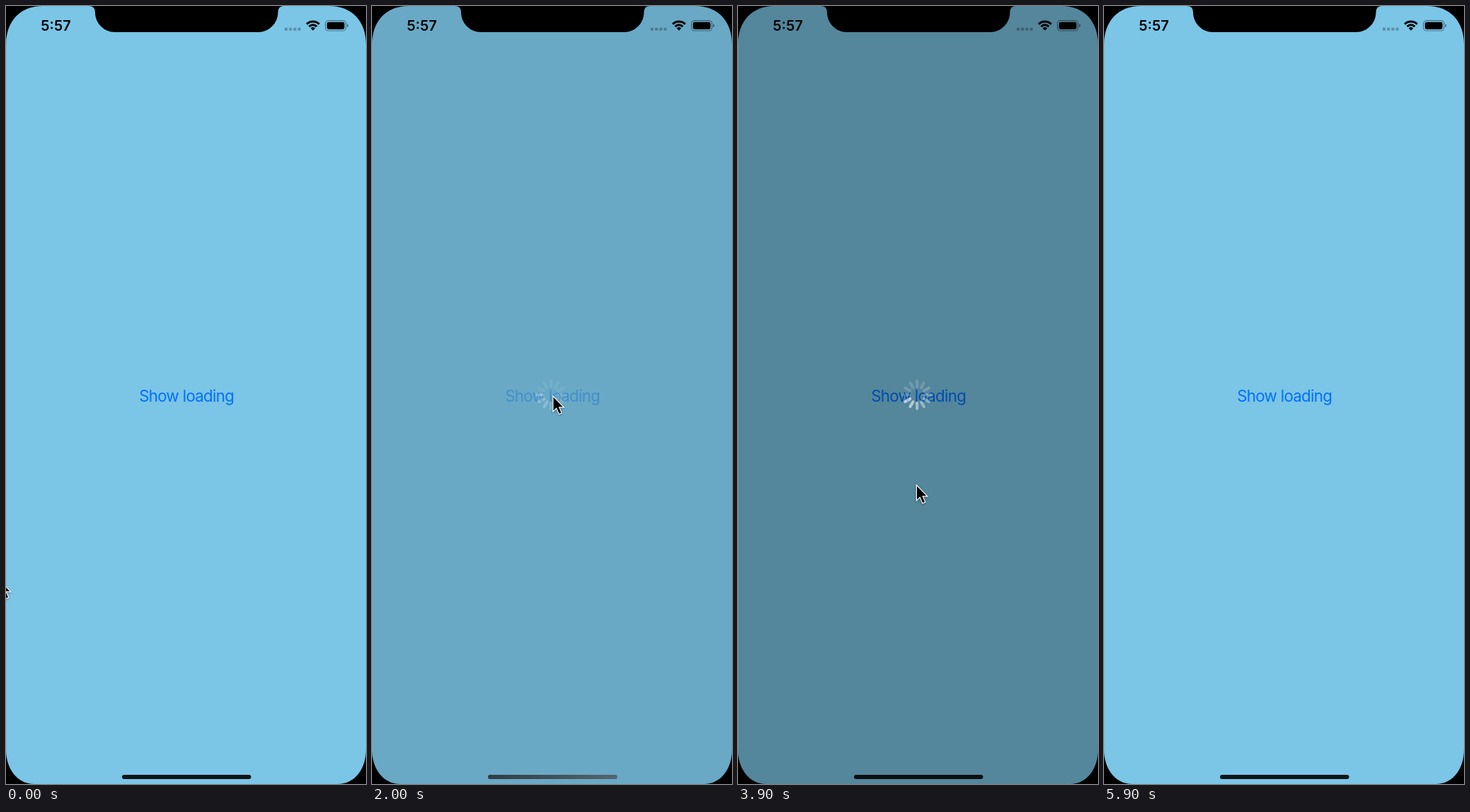
Animation of 509x1101 px, one loop 6 s. Source, as an HTML page:

```html
<!DOCTYPE html>
<html lang="en">
<head>
<meta charset="utf-8">
<title>Loading overlay</title>
<style>
  html, body { margin: 0; width: 100%; height: 100%; overflow: hidden; background: #000; }
  svg { display: block; width: 100%; height: 100%; }
  text { font-family: Inter, Roboto, sans-serif; text-anchor: middle; }
</style>
</head>
<body>
<svg viewBox="0 0 509 1101">
  <defs>
    <clipPath id="screen">
      <path d="M0 55C0 21 20 0 52 0H457C489 0 509 21 509 55V1052C509 1080 493 1101 469 1101H40C16 1101 0 1080 0 1052Z"/>
    </clipPath>
    <linearGradient id="sheen">
      <stop stop-color="#7e98a6" stop-opacity=".38"/>
      <stop offset="1" stop-color="#7e98a6" stop-opacity=".75"/>
    </linearGradient>
  </defs>
  <g clip-path="url(#screen)">
    <rect width="509" height="1101" fill="#7bc5e6"/>
    <text id="label" x="255.2" y="560" font-size="22.3" letter-spacing="-.7" fill="#0070fb">Show loading</text>
    <rect x="164" y="1088" width="182.5" height="6" rx="3" fill="#0e1417"/>
    <rect id="glow" x="164" y="1088" width="182.5" height="6" rx="3" fill="url(#sheen)"/>
    <rect id="dim" width="509" height="1101"/>
    <g id="spinner" transform="translate(253.2 550.2)" stroke="#fff" stroke-width="4" stroke-linecap="round"/>
    <rect width="1" height="1101" fill="#a0b0b5" opacity=".45"/>
  </g>
  <path d="M117 0Q126 0 126 9C126 24.5 138.5 37 154 37H356.5C372 37 384.5 24.5 384.5 9Q384.5 0 393 0Z"/>

  <text x="70.5" y="35" font-size="20" font-weight="600">5:57</text>
  <path d="M394 32.7H417" stroke="#000" stroke-opacity=".27" stroke-width="4" stroke-dasharray="4 2.2"/>
  <g fill="none" stroke="#000" stroke-width="3">
    <path d="M425.2 25.7A12.4 12.4 0 0 1 442.8 25.7M428.6 29.1A7.6 7.6 0 0 1 439.4 29.1"/>
    <path d="M434 34.7L430.8 31.4A4.5 4.5 0 0 1 437.2 31.4Z" fill="#000" stroke="none"/>
  </g>
  <rect x="451.7" y="20.6" width="29" height="14.4" rx="4.2" fill="none" stroke="#000" stroke-opacity=".42" stroke-width="1.2"/>
  <rect x="453.8" y="22.7" width="24.8" height="10.2" rx="2.4"/>
  <path d="M482.3 25.3Q484.3 26 484.3 27.8T482.3 30.3Z" opacity=".45"/>

  <path id="cursor" d="M1 2.5V21.5L5.4 17.3L9.2 26L12 24.8L8.3 16.2H14.4Z"
    stroke="#fff" stroke-width="2.4" paint-order="stroke" style="filter:drop-shadow(0 1.5px 1.5px #0006)"/>
</svg>
<script>
const LOOP = 6000, STEP = 100, SPOKES = 12;
const $ = id => document.getElementById(id);
const ease = p => p * p * (3 - 2 * p);
const ramp = (t, start, length) => ease(Math.min(1, Math.max(0, (t - start) / length)));

// Cursor stops: time, x, y
const path = [
  [0, -9, 812], [800, 255, 554], [1200, 255, 554], [1500, 255.5, 551],
  [2900, 255.5, 551], [3500, 252, 677], [4400, 252, 677], [5200, -24, 820], [LOOP, -24, 820]
];

const spokes = Array.from({ length: SPOKES }, (_, i) => {
  const line = document.createElementNS("http://www.w3.org/2000/svg", "path");
  line.setAttribute("d", "M0-11.5V-19.5");
  line.setAttribute("transform", `rotate(${i * 360 / SPOKES})`);
  return $("spinner").appendChild(line);
});

function cursorAt(t) {
  const i = path.findIndex(stop => stop[0] > t);
  const [t0, x0, y0] = path[i - 1], [t1, x1, y1] = path[i];
  const p = ramp(t, t0, t1 - t0);
  return [x0 + (x1 - x0) * p, y0 + (y1 - y0) * p];
}

function draw(now) {
  const t = Math.floor(now % LOOP / STEP) * STEP;
  const shown = ramp(t, 1840, 420) - ramp(t, 3755, 410);
  const pressed = ramp(t, 1700, 100) - ramp(t, 2000, 200);
  const head = Math.floor((t - 2200) * SPOKES / 1000 + .25) + 10 * SPOKES;

  $("dim").setAttribute("opacity", .45 * shown);
  $("label").setAttribute("opacity", 1 - .64 * pressed);
  $("spinner").setAttribute("opacity", shown);
  $("glow").setAttribute("opacity", ramp(t, 1700, 300) - ramp(t, 3600, 300));
  $("cursor").setAttribute("transform", `translate(${cursorAt(t)})`);
  spokes.forEach((spoke, i) => {
    const age = (head - i) % SPOKES;
    spoke.setAttribute("opacity", Math.max(.24, .88 - age * .1));
  });
  requestAnimationFrame(draw);
}

draw(0);
</script>
</body>
</html>
```
